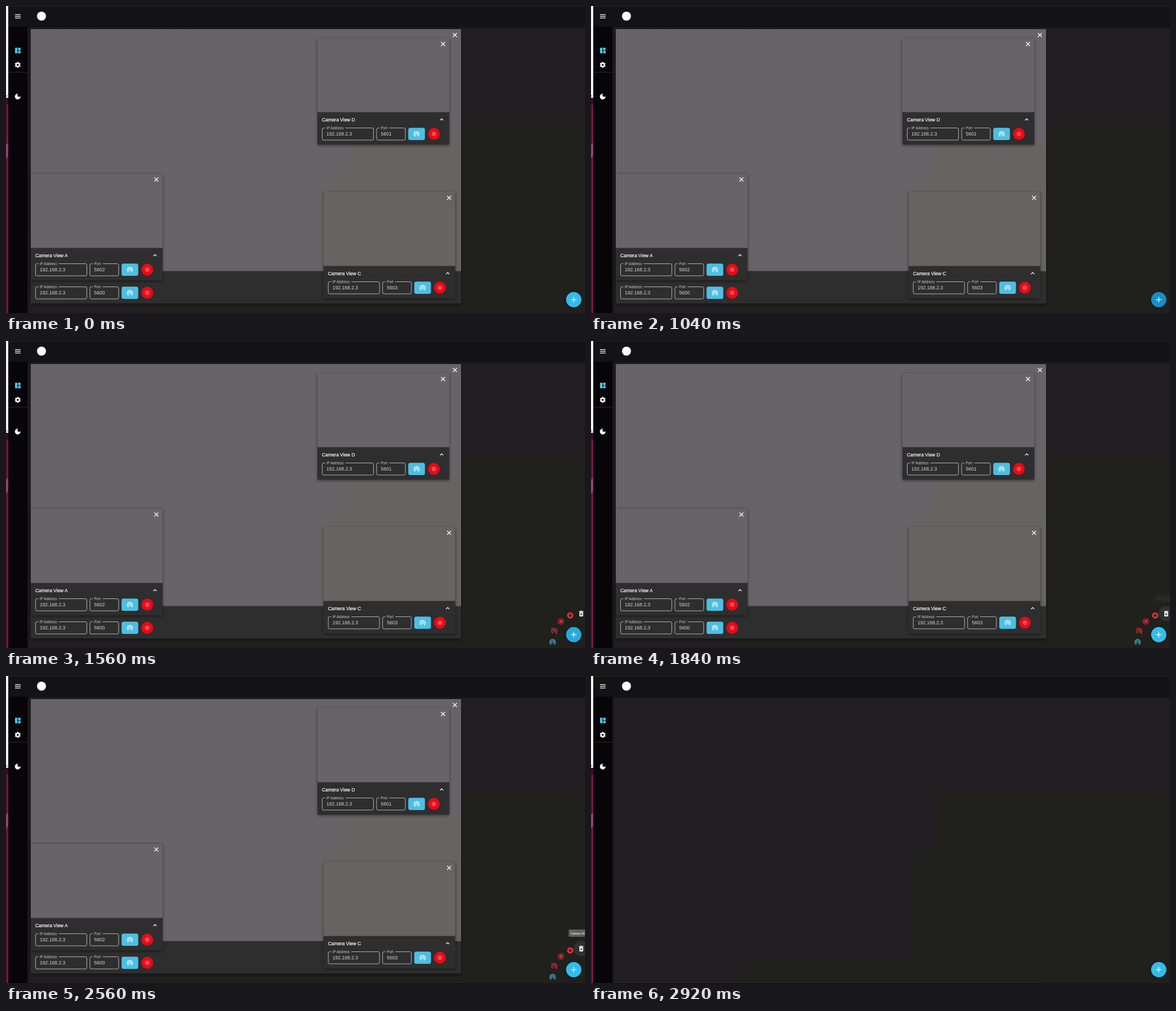
An HTML page for the animation above (4200 ms loop, 1028x545 px).

```html
<!DOCTYPE html>
<html lang="en">
<head>
<meta charset="utf-8">
<title>Camera dashboard</title>
<style>
  html, body { margin: 0; width: 100%; height: 100%; overflow: hidden; background: #131214; }
  svg { display: block; width: 100%; height: 100%; }
  text { font-family: "Liberation Sans", Arial, sans-serif; }
</style>
</head>
<body>
<svg id="stage" viewBox="0 0 1028 545" xmlns="http://www.w3.org/2000/svg">
  <defs>
    <filter id="shadow" x="-10%" y="-10%" width="120%" height="125%">
      <feDropShadow dx="0" dy="1.5" stdDeviation="2.5" flood-color="#000" flood-opacity=".5"/>
    </filter>
    <filter id="fabShadow" x="-40%" y="-40%" width="180%" height="190%">
      <feDropShadow dx="0" dy="2" stdDeviation="2.5" flood-color="#000" flood-opacity=".5"/>
    </filter>
    <linearGradient id="fadeDown" x2="0" y2="1">
      <stop stop-color="#000" stop-opacity=".4"/><stop offset="1" stop-color="#000" stop-opacity="0"/>
    </linearGradient>
    <linearGradient id="fadeRight">
      <stop stop-color="#000" stop-opacity=".3"/><stop offset="1" stop-color="#000" stop-opacity="0"/>
    </linearGradient>
    <g id="tether" fill="none" stroke="currentColor" stroke-width="2">
      <path d="M-4.5 7.8A9 9 0 1 1 4.5 7.8M-2.5 4.3A5 5 0 1 1 2.5 4.3"/>
      <circle r="2" fill="currentColor" stroke="none"/>
    </g>
    <path id="close" d="M-3.5 -3.5L3.5 3.5M3.5 -3.5L-3.5 3.5" fill="none" stroke="#fff" stroke-width="1.2"/>
  </defs>

  <rect width="1028" height="545" fill="#211f22"/>
  <path d="M608 208H1028V545H262V512H575V309H608Z" fill="#20201d"/>
  <rect x="38" y="36" width="990" height="5" fill="url(#fadeDown)"/>
  <rect x="38" y="36" width="5" height="509" fill="url(#fadeRight)"/>
  <path d="M42 532H806" stroke="#1b191b"/>

  <g id="cards"></g>

  <rect x="4" width="1024" height="36.5" fill="#131214"/>
  <path d="M4 .5H1028" stroke="#252427"/>
  <rect x="4" y="36.5" width="34" height="508.5" fill="#070508"/>
  <path d="M4 117.5H38" stroke="#29272a"/>
  <rect width="4" height="163" fill="#f3f3f6"/>
  <rect y="159" width="2.5" height="1.2" fill="#555"/>
  <rect y="163" width="4" height="382" fill="#781548"/>
  <rect y="163" width="4" height="12" fill="#3d0a2a"/>
  <path d="M.5 175V545" stroke="#4b0c30"/>
  <path d="M0 246L4 243V266L0 271Z" fill="#96406f"/>

  <path d="M16 15.3H26M16 18.3H26M16 21.3H26" stroke="#fff" stroke-width="1.2"/>
  <circle cx="63" cy="18" r="8" fill="#fff"/>
  <path d="M17 74H20.3V84H17Q16 84 16 83V75Q16 74 17 74ZM21.4 74H25Q26 74 26 75V78.4H21.4ZM21.4 79.5H26V83Q26 84 25 84H21.4Z" fill="#4cc3ea"/>
  <g id="gear" transform="translate(20.8 104.5)" stroke="#fff" fill="none">
    <circle r="2.9" stroke-width="2.2"/>
  </g>
  <path transform="translate(14.1 154) scale(.56)" fill="#fff" d="M12 3c-4.97 0-9 4.03-9 9s4.03 9 9 9 9-4.03 9-9c0-.46-.04-.92-.1-1.36-.98 1.37-2.58 2.26-4.4 2.26-2.98 0-5.4-2.42-5.4-5.4 0-1.81.89-3.42 2.26-4.4-.44-.06-.9-.1-1.36-.1z"/>

  <g class="action" data-x="970.5" data-y="534.5" color="#4cc3ea"><use href="#tether" transform="scale(.55)"/></g>
  <g class="action" data-x="973.5" data-y="515" color="#e0303c">
    <use href="#tether" transform="scale(.55)"/>
    <path d="M-5.4 -4.2L4.6 5.6" stroke="#20201d" stroke-width="2.6"/>
    <path d="M-5.4 -5L5 5.4" stroke="#e0303c" stroke-width="1.1"/>
  </g>
  <g class="action" data-x="985.2" data-y="497.7">
    <circle r="4.9" fill="none" stroke="#e62c38" stroke-width="1.1"/><circle r="2.8" fill="#e62c38"/>
  </g>
  <g class="action" data-x="1001.7" data-y="487.2">
    <circle r="5.5" fill="#ee2c3a"/><rect x="-2.2" y="-2.2" width="4.4" height="4.4" fill="#20201d"/>
  </g>
  <g class="action" data-x="1021.3" data-y="484">
    <circle id="hover" r="13.5" fill="#303030"/>
    <path transform="translate(-6.6 -6.6) scale(.55)" fill="#fff" fill-rule="evenodd" d="M6 19c0 1.1.9 2 2 2h8c1.1 0 2-.9 2-2V7H6v12zm2.46-7.12 1.41-1.41L12 12.59l2.12-2.12 1.41 1.41L13.41 14l2.12 2.12-1.41 1.41L12 15.41l-2.12 2.12-1.41-1.41L10.59 14l-2.13-2.12zM15.5 4l-1-1h-5l-1 1H5v2h14V4z"/>
  </g>

  <circle id="fab" cx="1008" cy="521.3" r="13.5" filter="url(#fabShadow)"/>
  <path d="M1003.2 521.3H1012.8M1008 516.5V526.1" stroke="#fff" stroke-width="1.3"/>

  <g id="tip">
    <rect x="-22" y="-13" width="44" height="13" rx="2" fill="#5f5f60"/>
    <text x="-18" y="-4.4" font-size="5.7" fill="#fff">Delete All</text>
  </g>
</svg>
<script>
const LOOP = 4200;
const OPEN = 1035, LEAVE = 1480, CLOSE = 2600;
const $ = id => document.getElementById(id);
const clamp = v => Math.min(1, Math.max(0, v));
const ramp = (t, start, length) => {
  const p = clamp((t - start) / length);
  return p * p * (3 - 2 * p);
};

// Outlined text field with a notch for its label
function field(x, y, w, label, notch, value) {
  const h = 21.5, r = 2.5;
  return `<path d="M${x + 5} ${y}H${x + r}a${r} ${r} 0 0 0 ${-r} ${r}V${y + h - r}a${r} ${r} 0 0 0 ${r} ${r}
      H${x + w - r}a${r} ${r} 0 0 0 ${r} ${-r}V${y + r}a${r} ${r} 0 0 0 ${-r} ${-r}H${x + notch}"
      fill="none" stroke="#c4c3c4" stroke-width=".9"/>
    <text x="${x + 7.5}" y="${y + 2}" font-size="6.3" fill="#c8c7c8">${label}</text>
    <text x="${x + 7.5}" y="${y + 13.3}" font-size="8.6" fill="#d6d5d6">${value}</text>`;
}

function card({ x, top, right, bottom, name, port, color, tint = "" }) {
  const split = bottom - 57.5, row = bottom - 29.5;
  return `<g>
    <rect x="${x}" y="${top}" width="${right - x}" height="${bottom - top}" rx="1.5" fill="#2f2d2f" filter="url(#shadow)"/>
    <rect x="${x}" y="${top}" width="${right - x}" height="${split - top}" fill="${color}"/>
    ${tint}
    <use href="#close" x="${right - 11}" y="${top + 10.5}"/>
    <text x="${x + 8}" y="${bottom - 41.5}" font-size="8.4" fill="#fff" stroke="#fff" stroke-width=".2">${name}</text>
    <path d="M${right - 16.3} ${bottom - 43}l2.8 -2.8l2.8 2.8" fill="none" stroke="#fff" stroke-width="1.2"/>
    ${field(x + 8.5, row, 91, "IP Address", 41, "192.168.2.3")}
    ${field(x + 105, row, 51, "Port", 22.5, port)}
    <rect x="${x + 161.2}" y="${row - .2}" width="29.6" height="21.6" rx="3.5" fill="#4dbfe2"/>
    <use href="#tether" color="#fff" transform="translate(${x + 176} ${row + 11}) scale(.53)"/>
    <circle cx="${x + 206.7}" cy="${row + 10.6}" r="10.5" fill="#e80a17"/>
    <circle cx="${x + 206.7}" cy="${row + 10.6}" r="4.2" fill="#ef4a55"/>
  </g>`;
}

$("cards").innerHTML = [
  { x: 44, top: 41, right: 808, bottom: 528, name: "Camera View B", port: 5600, color: "#666467",
    tint: '<path d="M608 246H808V470.5H575V309H608Z" fill="#656461"/>' },
  { x: 553, top: 57, right: 787, bottom: 246, name: "Camera View D", port: 5601, color: "#666467" },
  { x: 44, top: 297.5, right: 278, bottom: 487, name: "Camera View A", port: 5602, color: "#666467" },
  { x: 563.7, top: 330, right: 797.7, bottom: 519, name: "Camera View C", port: 5603, color: "#656461" }
].map(card).join("");

for (let a = 0; a < 360; a += 60)
  $("gear").insertAdjacentHTML("beforeend", `<path d="M0 -3V-5.2" stroke-width="2.6" transform="rotate(${a})"/>`);

const actions = [...document.querySelectorAll(".action")];
const BRIGHT = [51, 189, 236], DARK = [18, 143, 198];

function draw(t) {
  $("cards").style.display = t < CLOSE - 10 ? "" : "none";

  const hovered = t < OPEN ? 0 : 1 - clamp(1 - (1 - (t - LEAVE) / 220) ** 2) * (t > LEAVE && t < LEAVE + 220) - (t >= LEAVE + 220);
  $("fab").setAttribute("fill", `rgb(${BRIGHT.map((c, i) => Math.round(c + (DARK[i] - c) * hovered))})`);

  // Actions open one after the other and close in reverse
  actions.forEach((el, i) => {
    const s = ramp(t, OPEN + 25 * i, 150) - ramp(t, CLOSE + 30 * (actions.length - 1 - i), 190);
    el.setAttribute("transform", `translate(${el.dataset.x} ${el.dataset.y}) scale(${s})`);
    el.setAttribute("opacity", s);
  });
  $("hover").setAttribute("opacity", ramp(t, 1640, 160));

  const tip = ramp(t, 1775, 180) - ramp(t, CLOSE + 20, 200);
  const scale = .85 + .15 * tip;
  $("tip").setAttribute("transform", `translate(1021 463) scale(${scale} ${scale})`);
  $("tip").setAttribute("opacity", tip * tip);
}

const begin = performance.now();
function tick() {
  draw((performance.now() - begin) % LOOP);
  requestAnimationFrame(tick);
}
tick();
</script>
</body>
</html>
```
